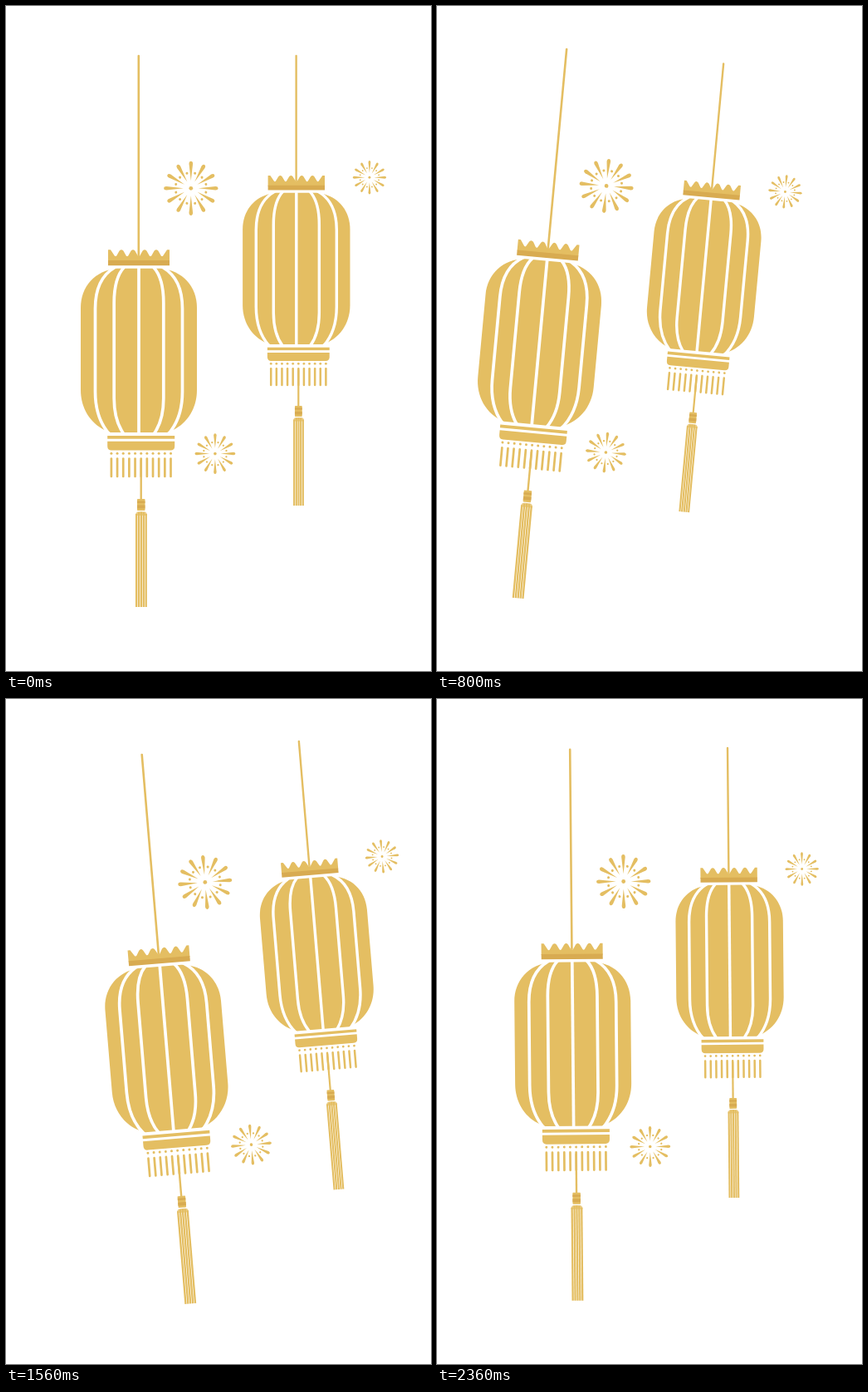
Write an HTML page that moves like this. It is 512 by 800 pixels and loops after 2400 ms.

```html
<!DOCTYPE html>
<html lang="en">
<head>
<meta charset="utf-8">
<title>Swinging lanterns</title>
<style>
  html, body { margin: 0; width: 100%; height: 100%; overflow: hidden; background: #fff; }
  svg { display: block; width: 100vw; height: 100vh; }
</style>
</head>
<body>
<svg id="stage" viewBox="0 0 512 800"></svg>
<script>
const GOLD = '#e4be62', DARK = '#d8ab51';
const LOOP = 2400, STEP = 40, SWING = 8, PIVOT = '244.5 17';

const repeat = (n, fn) => Array.from({ length: n }, (_, i) => fn(i)).join('');

const rect = (x, y, w, h, fill = GOLD, rx = 0) =>
  `<rect x="${x}" y="${y}" width="${w}" height="${h}" rx="${rx}" fill="${fill}"/>`;

const line = (x, y1, y2, w, cap = 'round') =>
  `<path d="M${x} ${y1}V${y2}" stroke="${GOLD}" stroke-width="${w}" stroke-linecap="${cap}"/>`;

// Zigzag rim with rounded peaks, closed along the dark band
function crown() {
  let d = 'M123 307V293.2H126';
  for (let i = 0; i < 5; i++) {
    const v = 132 + i * 14;
    d += `L${v - 1.2} 300.4Q${v} 301.8 ${v + 1.2} 300.4`;
    if (i < 4) d += `L${v + 4.6} 294.6Q${v + 7} 291.8 ${v + 9.4} 294.6`;
  }
  return `<path d="${d}L194 293.2H197V307Z" fill="${GOLD}"/>` + rect(123, 306, 74, 6.2, DARK);
}

function body() {
  const shell = 'M90 363C90 338 107 318 134 315.8H186C213 318 230 338 230 363' +
    'V462C230 486 216 506 194 513H126C104 506 90 486 90 462Z';
  const ribs = 'M131 314.5C113 325 107.5 343 107.5 364V464C107.5 484 113 502 124.500 515' +
    'M142.500 314C134 323 130.200 338 130.200 357V472C130.200 490 134 504 142 515';
  const half = `<path d="${ribs}"/>`;
  return `<path d="${shell}" fill="${GOLD}"/>
    <g fill="none" stroke="#fff" stroke-width="3.7">
      ${half}<g transform="matrix(-1 0 0 1 320 0)">${half}</g><path d="M160 315V514"/>
    </g>`;
}

function base() {
  return rect(122.2, 517, 81, 3.7) +
    `<path d="M122.200 523.700H203.200V529.500Q203.200 534.600 198.200 534.600H127.200Q122.200 534.600 122.200 529.500Z" fill="${GOLD}"/>` +
    repeat(11, i => {
      const x = 126.9 + i * 7.16;
      return `<circle cx="${x}" cy="538.2" r="1.5" fill="${GOLD}"/>` + line(x, 544.6, 566, 2.7);
    });
}

function tassel() {
  const top = [611, 609, 608.6, 609, 611];
  return line(162.7, 546, 594, 2.4, 'butt') +
    rect(158, 593, 9.5, 14, GOLD, 0.8) +
    rect(158, 595.5, 9.5, 2.6, DARK) + rect(158, 600.5, 9.5, 4, DARK) +
    repeat(5, i => line(157.1 + i * 2.9, top[i], 723, 2.3, 'butt')) +
    `<path d="M156 613Q156 608.200 160 608.200H166Q170 608.200 170 613Z" fill="${GOLD}" opacity=".75"/>`;
}

const lantern = (x, y, scale, ropeTop) =>
  `<g transform="translate(${x} ${y}) scale(${scale}) translate(-160 -316)">
    ${line(159.8, ropeTop + 1, 300, 2.6)}${crown()}${body()}${base()}${tassel()}
  </g>`;

const spark = (x, y, scale) =>
  `<g transform="translate(${x} ${y}) scale(${scale})" fill="${GOLD}">
    <circle r="2.4"/>
    ${repeat(12, i => `<g transform="rotate(${i * 30})">
      <path d="M9 0L29.500 -2.300Q32.600 -2.200 32.600 0Q32.600 2.200 29.500 2.300Z"/>
      <circle cx="18.700" r="1.5" transform="rotate(15)"/></g>`)}
  </g>`;

document.getElementById('stage').innerHTML = `<g id="swing">
  ${lantern(160, 316, 1, 59)}
  ${lantern(349.8, 225, 0.924, 136.3)}
  ${spark(222.8, 219.3, 1)}
  ${spark(251.9, 538.6, 0.75)}
  ${spark(437.9, 206.3, 0.62)}
</g>`;
const swing = document.getElementById('swing');

// Triangle wave at 25 poses a second; the small lead absorbs timer jitter
function draw(ms) {
  const t = Math.floor((ms + 10) / STEP) * STEP % LOOP;
  const q = t / (LOOP / 4);
  const wave = q < 1 ? q : q < 3 ? 2 - q : q - 4;
  swing.setAttribute('transform', `rotate(${SWING * wave} ${PIVOT})`);
}

const start = performance.now();
function tick() {
  draw(performance.now() - start);
  requestAnimationFrame(tick);
}
draw(0);
requestAnimationFrame(tick);
</script>
</body>
</html>
```
